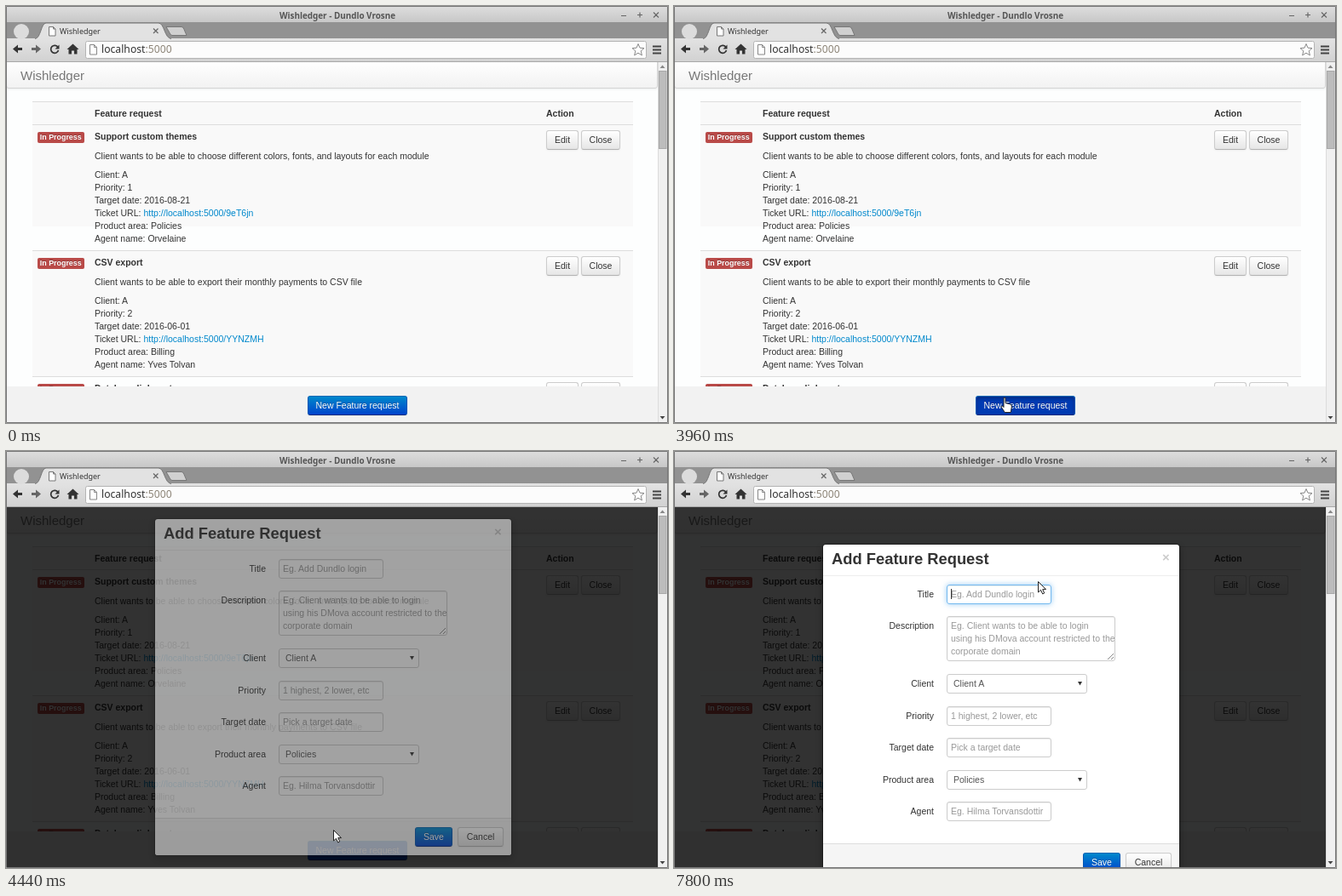
An HTML page that plays this animation: 777 px wide and 490 px high, repeating every 8 s.

```html
<!DOCTYPE html>
<html lang="en">
<head>
<meta charset="utf-8">
<title>Feature requests</title>
<style>
html, body { margin: 0; width: 100%; height: 100%; overflow: hidden; }
#stage { position: relative; width: 777px; height: 490px; overflow: hidden; background: #fdfefe;
  font: 10.5px/15px "Liberation Sans", Arial, sans-serif; color: #333; white-space: nowrap; cursor: default; }
#stage div, #stage svg { position: absolute; box-sizing: border-box; }
.layer { left: 0; top: 0; width: 777px; height: 490px; }
.ui { font-family: "Noto Sans", "Open Sans", sans-serif; }
#page { clip-path: inset(65px 12px 1px 1px); }
#nav { left: 0; top: 64px; width: 765px; height: 33px; padding: 9px 16px; font-size: 15px; color: #777;
  background: linear-gradient(#fff, #f2f2f2); border: 1px solid #d4d4d4; border-radius: 0 0 3px 3px;
  box-shadow: 0 1px 3px rgba(0,0,0,.07); }
.row { left: 31px; width: 705px; height: 147.75px; border-top: 1px solid #ddd; }
.row.odd { background: #f9f9f9; }
.row div { left: 73px; }
.row .act { left: 603px; }
.row .tag { left: 6px; top: 8px; width: 54.5px; height: 13px; border-radius: 2px; background: #b94a48;
  color: #fff; font: bold 8.88px/13px "Liberation Sans", Arial, sans-serif; text-align: center;
  text-shadow: 0 -1px 0 rgba(0,0,0,.25); }
.link { color: #08c; }
#stage .btn { height: 23px; padding-top: 3px; border: 1px solid #ccc; border-bottom-color: #b3b3b3; border-radius: 3px;
  text-align: center; background: linear-gradient(#fff, #e6e6e6); text-shadow: 0 1px 1px rgba(255,255,255,.75);
  box-shadow: 0 1px 2px rgba(0,0,0,.05); }
#stage .primary { color: #fff; text-shadow: 0 -1px 0 rgba(0,0,0,.25); border-color: #0067b4 #0055b4 #002a80;
  background: linear-gradient(#08c, #04c); }
#stage .primary.hover { background: #04c; }
#stage .primary.down { box-shadow: inset 0 2px 4px rgba(0,0,0,.3); background: #003bb3; }
#foot { left: 0; top: 447px; width: 765px; height: 43px; background: #f2f2f2; }
#shade { background: #000; }
#modal { left: 174px; width: 420px; height: 397px; background: #fff; border: 1px solid rgba(0,0,0,.3);
  border-radius: 4px; background-clip: padding-box; box-shadow: 0 3px 7px rgba(0,0,0,.3); overflow: hidden; }
#modal h3 { position: absolute; margin: 0; left: 10px; top: 2px; font: bold 18.375px/30px "Liberation Sans", Arial, sans-serif; }
#modal .head { left: 0; top: 36px; width: 100%; border-top: 1px solid #eee; }
#modal .x { left: 398px; top: 7px; font-weight: bold; font-size: 15px; color: #ccc; }
#modal .bar { left: 0; top: 351px; width: 100%; height: 46px; background: #f5f5f5; border-top: 1px solid #ddd; }
#modal .label { right: 288px; }
#modal .field { left: 145px; padding: 3px 4px; border: 1px solid #ccc; border-radius: 3px; color: #999;
  overflow: hidden; box-shadow: inset 0 1px 1px rgba(0,0,0,.075); white-space: pre; }
#modal .select { color: #555; padding-left: 7px; box-shadow: none; }
#caret { left: 150px; top: 52px; width: 1px; height: 12px; background: #333; }
#cursor { overflow: visible; left: 0; top: 0; width: 1px; height: 1px; }
</style>
</head>
<body>
<div id="stage">
  <div id="page" class="layer">
    <div id="nav">Wishledger</div>
    <div class="row odd" style="top:111.6px"><div style="top:6px"><b>Feature request</b></div><div class="act" style="top:6px"><b>Action</b></div></div>
    <div id="rows"></div>
    <div id="foot"></div>
    <div id="add" class="btn primary" style="left:354px;top:458px;width:117px">New Feature request</div>
    <div id="shade" class="layer"></div>
    <div id="modal">
      <h3>Add Feature Request</h3><div class="x">×</div><div class="head"></div>
      <div id="form"></div>
      <div id="caret"></div>
      <div class="bar"></div>
      <div class="btn primary" style="left:305px;top:362px;width:44px">Save</div>
      <div class="btn" style="left:355px;top:362px;width:54px">Cancel</div>
    </div>
  </div>

  <svg class="layer ui" viewBox="0 0 777 490">
    <defs>
      <linearGradient id="gTitle" x2="0" y2="1"><stop stop-color="#dedede"/><stop offset="1" stop-color="#c6c6c6"/></linearGradient>
      <linearGradient id="gTool" x2="0" y2="1"><stop stop-color="#e2e2e2"/><stop offset="1" stop-color="#d2d2d2"/></linearGradient>
    </defs>
    <rect width="777" height="20" fill="url(#gTitle)"/>
    <rect y="19" width="777" height="20" fill="#929292"/>
    <rect y="38" width="777" height="27" fill="url(#gTool)"/>
    <path d="M0,65.5H777" stroke="#a8a8a8"/>
    <text x="389" y="15" font-size="9.9" font-weight="700" fill="#555" text-anchor="middle">Wishledger - Dundlo Vrosne</text>
    <path d="M722,11.5h6M741,10.5h6M744,7.5v6M760,7.5l6,6M766,7.5l-6,6" stroke="#666" stroke-width="1.2"/>
    <circle cx="18" cy="30" r="9" fill="#dcdcdc"/>
    <path d="M34,38.5C41,38 41,20 47,20H179C186,20 186,38 194,38.5" fill="#e2e2e2" stroke="#777"/>
    <path d="M50.500,24.500h5l2.500,2.500v8h-7.500zM55.500,24.500v2.500h2.500" fill="#fff" stroke="#777"/>
    <text x="63" y="32.500" font-size="9" fill="#333">Wishledger</text>
    <path d="M173,26.500l5.500,5.500M178.500,26.500l-5.500,5.500" stroke="#666" stroke-width="1.2"/>
    <path d="M188,24.500h18q2,0 3,3l3,7h-17q-2,0 -3,-3z" fill="#d0d0d0" stroke="#777"/>
    <path d="M8,50.500l6,-5v3.500h5v3h-5v3.500z" fill="#333"/>
    <path d="M41,50.500l-6,-5v3.500h-5v3h5v3.500z" fill="#666"/>
    <path d="M61,48.500A4.500,4.500 0 1 0 61.500,52" fill="none" stroke="#333" stroke-width="1.7"/>
    <path d="M62.500,45.500v5h-5z" fill="#333"/>
    <path d="M78.500,44.500l7,6.500h-2v5.500h-3.500v-4h-3v4h-3.500v-5.500h-2z" fill="#333"/>
    <rect x="93.500" y="41.500" width="658" height="20" rx="2" fill="#fcfcfc" stroke="#b4b4b4"/>
    <path d="M98.500,45.500h5l3,3v8.500h-8zM103.500,45.500v3h3" fill="#fff" stroke="#888"/>
    <text x="112" y="55" font-size="12.2" fill="#333">localhost<tspan fill="#8d8578">:5000</tspan></text>
    <path d="M742,44.500l2,4.700 5,.4-3.800,3.300 1.200,5-4.400,-2.700-4.400,2.700 1.200,-5-3.800,-3.300 5,-.4z" fill="#fff" stroke="#888"/>
    <path d="M759,47.500h10M759,51.500h10M759,55.500h10" stroke="#444" stroke-width="2"/>
    <rect x="765" y="66" width="11" height="424" fill="#f0f0f0"/>
    <path d="M765.500,66V490" stroke="#dcdcdc"/>
    <rect x="766.500" y="76.500" width="8.500" height="91" fill="#bcbcbc" stroke="#a8a8a8"/>
    <path d="M767.500,73h6l-3,-3.500z" fill="#888"/>
    <path d="M767.500,482h6l-3,3.500z" fill="#444"/>
    <path d="M.5,.5H776.500V489.500H.5z" fill="none" stroke="#777"/>
  </svg>

  <svg id="cursor">
    <g stroke="#222" stroke-linejoin="round">
      <path id="arrow" fill="#fff" d="M.5,.5v12.500l3,-2.700 2.200,4.700 2,-1 -2,-4.400h3.800z"/>
      <path id="hand" fill="#fff" d="M-1,.5q1,-1 2,0v6l6,1.500q1.500,.5 1.300,3l-1,6.500h-7l-4,-6q-.5,-2 1.500,-1.500l1.200,1.500z"/>
      <path id="beam" fill="none" stroke-width="1.300" d="M-3,-6.500q3,0 3,1.500V5q0,1.500 -3,1.500M3,-6.500q-3,0 -3,1.500V5q0,1.500 3,1.500M-2,2h4"/>
    </g>
  </svg>
</div>

<script>
const $ = id => document.getElementById(id);
const div = (cls, css, html) => `<div class="${cls}" style="${css}">${html}</div>`;

const requests = [
  ['Support custom themes', 'Client wants to be able to choose different colors, fonts, and layouts for each module',
    1, '2016-08-21', '9eT6jn', 'Policies', 'Orvelaine'],
  ['CSV export', 'Client wants to be able to export their monthly payments to CSV file',
    2, '2016-06-01', 'YYNZMH', 'Billing', 'Yves Tolvan'],
  ['Database link port', '', 3, '', '', '', '']
];
$('rows').innerHTML = requests.map(([title, text, priority, date, key, area, agent], i) =>
  div('row' + (i % 2 ? ' odd' : ''), `top:${139.35 + i * 147.75}px`,
    div('tag', '', 'In Progress') +
    div('', 'top:6px', `<b>${title}</b>`) +
    div('', 'top:28.5px', text) +
    div('', 'top:51px', ['Client: A', 'Priority: ' + priority, 'Target date: ' + date,
      `Ticket URL: <span class="link">http://localhost:5000/${key}</span>`,
      'Product area: ' + area, 'Agent name: ' + agent].join('<br>')) +
    div('btn', 'left:603px;top:6px;width:38px', 'Edit') +
    div('btn', 'left:644px;top:6px;width:46px', 'Close'))).join('');

// label, top, width, height, text, is a select
const fields = [
  ['Title', 47, 123, 23, 'Eg. Add Dundlo login'],
  ['Description', 84, 198, 53, 'Eg. Client wants to be able to login\nusing his DMova account restricted to the\ncorporate domain'],
  ['Client', 152, 165, 23, 'Client A', true],
  ['Priority', 190, 123, 23, '1 highest, 2 lower, etc'],
  ['Target date', 227, 123, 23, 'Pick a target date'],
  ['Product area', 265, 165, 23, 'Policies', true],
  ['Agent', 302, 123, 23, 'Eg. Hilma Torvansdottir']
];
const arrowDown = '<svg style="right:4px;top:8px" width="6" height="5"><path d="M0,0h5l-2.5,4.500z" fill="#333"/></svg>';
const grip = '<svg style="right:1px;bottom:1px" width="7" height="7"><path d="M0,7l7,-7M4,7l3,-3" stroke="#888"/></svg>';
$('form').style.width = '418px';
$('form').innerHTML = fields.map(([label, top, w, h, text, select]) =>
  div('label', `top:${top + 4}px`, label) +
  div('field' + (select ? ' select' : ''), `top:${top}px;width:${w}px;height:${h}px`,
    text + (select ? arrowDown : h > 23 ? grip : ''))).join('');
const titleField = document.querySelector('.field');

const STEP = 120, LOOP = 8000;
// pointer runs: start time, shape, then x,y per step
const runs = [
  [840, 'arrow', '721,225 719,221 715,215 710,208 707,205'],
  [1560, 'arrow', '700,197 682,178 662,160 645,151 656,149'],
  [2280, 'hand', '656,150'],
  [3120, 'arrow', '535,255 455,340 414,404 398,438'],
  [3600, 'hand', '391,453 388,459 388,460 388,460'],
  [4080, 'arrow', '387,460 387,460 386,456 384,445 366,330'],
  [4680, 'beam', '343,219 342,212 345,201'],
  [5040, 'arrow', '350,190 356,181'],
  [5280, 'beam', '363,174 367,172 369,172 372,171 388,168'],
  [5880, 'arrow', '411,159 427,153']
].map(([start, shape, path]) => ({ start, shape, path: path.split(' ') }));

const clamp = v => Math.max(0, Math.min(1, v));

function pointer(t) {
  const run = runs.filter(r => r.start <= t).pop();
  for (const id of ['arrow', 'hand', 'beam']) $(id).style.display = run && run.shape === id ? '' : 'none';
  if (!run) return;
  const i = Math.min(run.path.length - 1, (t - run.start) / STEP);
  const [x, y] = run.path[i].split(',');
  $('cursor').style.transform = `translate(${x}px,${y}px)`;
}

function draw(now) {
  const t = Math.floor(now % LOOP / STEP) * STEP;
  pointer(t);
  $('add').classList.toggle('hover', t >= 3600);
  $('add').classList.toggle('down', t === 3960);
  $('shade').style.opacity = t < 4080 ? 0 : t < 4200 ? .37 : .8;

  const p = clamp((t - 4275) / 300);
  $('modal').style.opacity = p;
  $('modal').style.top = Math.round(109 - 150 * (1 - p) ** 2) + 'px';

  const glow = clamp((t - 5640) / 200);
  titleField.style.borderColor = glow ? `rgba(82,168,236,${.4 + .4 * glow})` : '';
  titleField.style.boxShadow = glow
    ? `inset 0 1px 1px rgba(0,0,0,.075), 0 0 6px rgba(82,168,236,${.6 * glow})` : '';
  const caret = t >= 5760 && t < 6360 || t >= 6960 && t < 7440 || t >= 7800;
  $('caret').style.display = caret ? '' : 'none';
}

function loop(now) {
  draw(now);
  requestAnimationFrame(loop);
}
draw(0);
requestAnimationFrame(loop);
</script>
</body>
</html>
```
